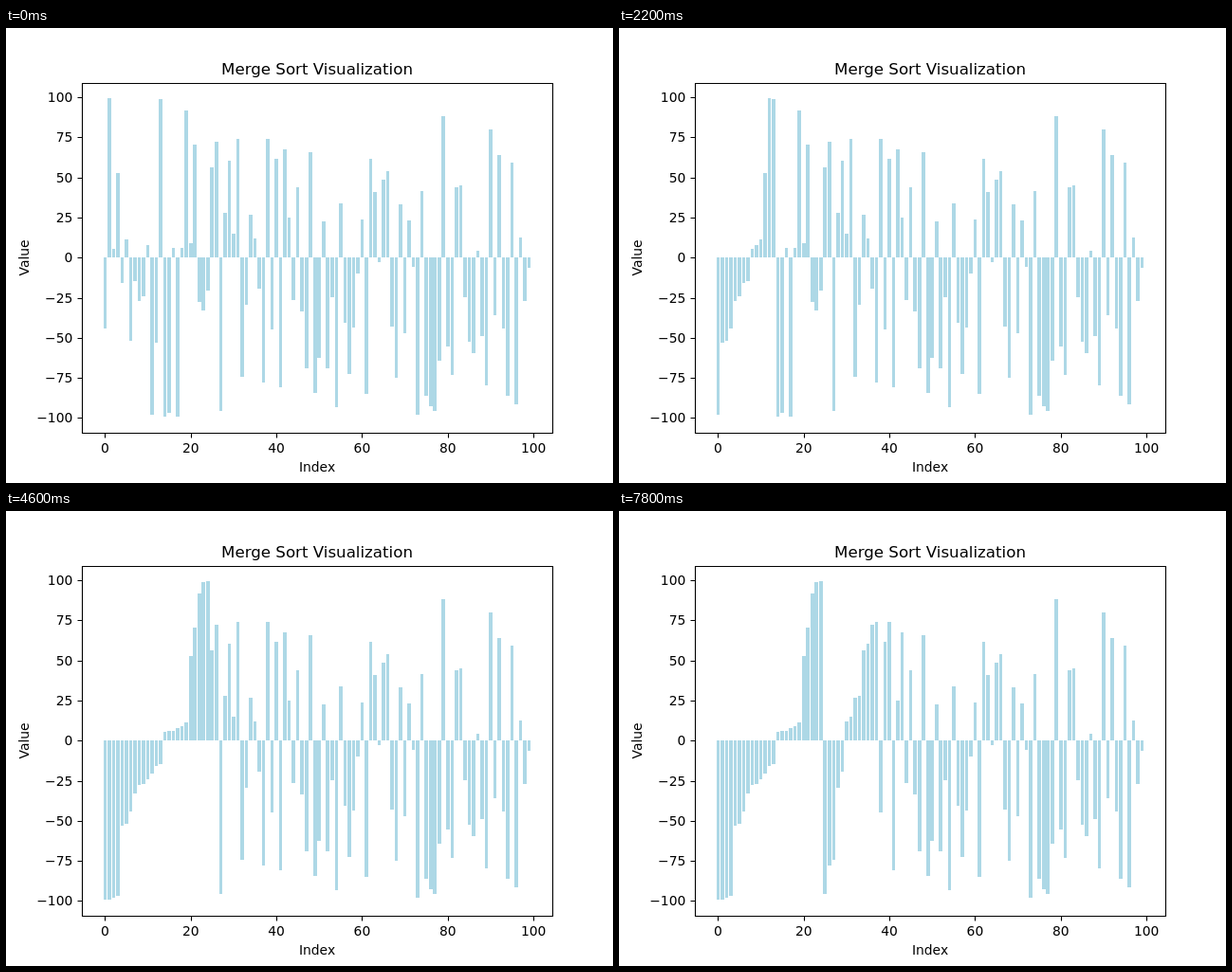
An HTML page for the animation above (8000 ms loop, 640 px wide and 480 px high).

```html
<!DOCTYPE html>
<html lang="en">
<head>
<meta charset="utf-8">
<title>Merge Sort Visualization</title>
<style>
  html, body { margin: 0; width: 100%; height: 100%; overflow: hidden; background: #fff; }
  svg { display: block; width: 640px; height: 480px; font: 13.889px "DejaVu Sans", sans-serif; }
  #bars { fill: #add8e6; shape-rendering: crispEdges; }
  #axes { fill: none; stroke: #000; stroke-width: 1.111; }
</style>
</head>
<body>
<svg viewBox="0 0 640 480">
  <path id="bars"/>
  <path id="axes"/>
  <g id="labels"></g>
</svg>
<script>
const STEP = 200, LOOP = 8000, ZERO = 242;

// Bar heights in pixels, positive upwards
const heights = [
  -75, 168, 9, 89, -27, 19, -88, -25, -46, -41, 13, -166, -90, 167, -168, -164, 10, -168, 10, 155,
  15, 119, -47, -56, -35, 95, 122, -162, 47, 102, 25, 125, -126, -50, 45, 20, -33, -132, 125, -76,
  104, -137, 114, 42, -45, 74, -57, -117, 111, -143, -106, 38, -117, -42, -158, 57, -69, -123, -74, -17,
  40, -144, 104, 69, -5, 82, 91, -73, -127, 56, -80, 39, -10, -166, 70, -146, -157, -162, -109, 149,
  -94, -124, 74, 76, -42, -89, -101, 7, -83, -135, 135, -61, 108, -75, -146, 100, -155, 21, -46, -11
];

const el = id => document.getElementById(id);
const xAt = i => 104.352 + 4.5181 * i;

function addText(text, x, y, anchor = "middle", extra = {}) {
  const node = document.createElementNS("http://www.w3.org/2000/svg", "text");
  const attrs = { x, y, "text-anchor": anchor, ...extra };
  for (const key in attrs) node.setAttribute(key, attrs[key]);
  node.textContent = text;
  el("labels").append(node);
}

function drawAxes() {
  let d = "M80.5 58.5H576.5V427.5H80.5Z";
  for (let i = 0; i <= 100; i += 20) {
    d += `M${Math.round(xAt(i)) + 0.5} 427.5v5`;
    addText(i, xAt(i), 448);
  }
  for (let v = -100; v <= 100; v += 25) {
    const y = Math.round(242.2 - v * 1.692);
    d += `M80.5 ${y + 0.5}h-5`;
    addText(String(v).replace("-", "\u2212"), 70.3, y + 5, "end");
  }
  el("axes").setAttribute("d", d);
  addText("Merge Sort Visualization", 328, 49, "middle", { "font-size": 16.667 });
  addText("Index", 328, 468);
  addText("Value", 0, 0, "middle", { transform: "translate(24 242.4) rotate(-90)" });
}

// Yields the array after every merge
function* mergeSort(a, lo = 0, hi = a.length - 1) {
  if (lo >= hi) return;
  const mid = (lo + hi) >> 1;
  yield* mergeSort(a, lo, mid);
  yield* mergeSort(a, mid + 1, hi);
  const merged = a.slice(lo, hi + 1).sort((p, q) => p - q);
  a.splice(lo, merged.length, ...merged);
  yield a;
}

function barPath(values) {
  return values.map((h, i) => {
    const left = Math.round(xAt(i - 0.4)), right = Math.round(xAt(i + 0.4));
    return `M${left} ${ZERO}H${right}v${-h}H${left}Z`;
  }).join("");
}

drawAxes();
const paths = [];
for (const state of mergeSort(heights)) {
  paths.push(barPath(state));
  if (paths.length === LOOP / STEP) break;
}

let shown = -1;
const start = performance.now();
function tick() {
  const step = Math.floor(((performance.now() - start) % LOOP) / STEP);
  if (step !== shown) el("bars").setAttribute("d", paths[shown = step]);
  requestAnimationFrame(tick);
}
tick();
</script>
</body>
</html>
```
